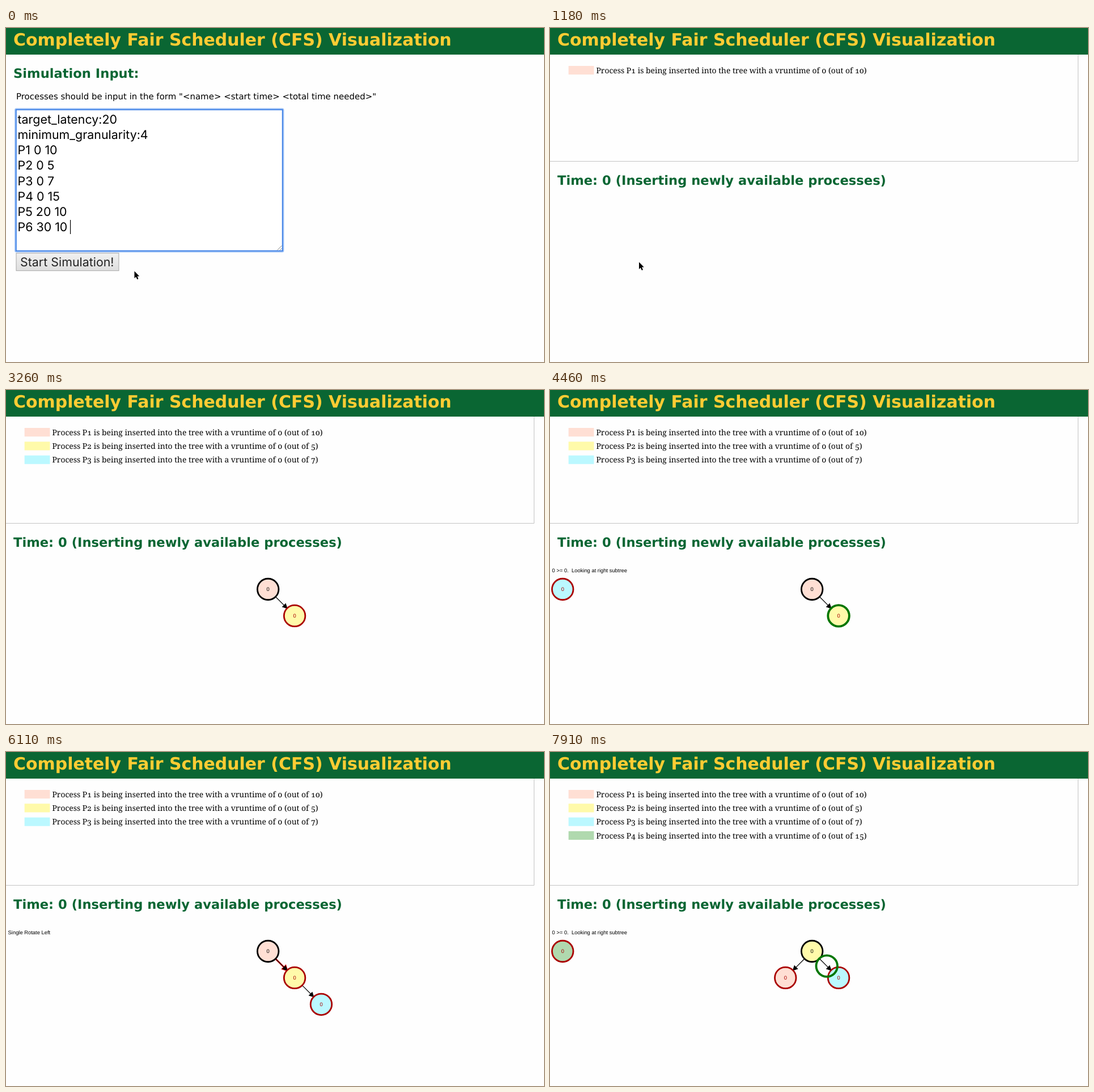
These frames come from a looping animation (949 px wide and 590 px high, 8 s). An HTML page:

```html
<!DOCTYPE html>
<html lang="en">
<head>
<meta charset="utf-8">
<title>Completely Fair Scheduler</title>
<style>
  html, body { margin: 0; width: 100%; height: 100%; overflow: hidden; background: #fefefe; }
  svg { display: block; width: 949px; height: 590px; }
  text { white-space: pre; text-rendering: geometricPrecision; }
  .head { font: bold 22.63px "DejaVu Sans", sans-serif; fill: #0a6633; }
  .title { font-size: 29.95px; fill: #fc3; }
  .hint { font: 14.97px "DejaVu Sans", sans-serif; }
  .field { font: 21.4px Inter, sans-serif; }
  .log { font: 13.86px "Noto Serif", serif; font-variant-numeric: oldstyle-nums; }
  .label { font: 9.4px "Liberation Sans", sans-serif; }
</style>
</head>
<body>
<svg id="stage" viewBox="0 0 949 590"></svg>
<script>
const LOOP = 8000, STEP = 150;
const R = 18.76, RED = '#a00', BLACK = '#000', HIGHLIGHT = '#f00', RING = '#070';
const FILLS = ['#ffdfd4', '#fffaaa', '#bbf8ff', '#b0d9ae'];
const BURSTS = [10, 5, 7, 15];
const LOG_TIMES = [1180, 1620, 3260, 6860];
const INPUT = ['target_latency:20', 'minimum_granularity:4', 'P1 0 10', 'P2 0 5',
  'P3 0 7', 'P4 0 15', 'P5 20 10', 'P6 30 10'];

// Places in the tree
const START = [22.3, 352], ROOT = [462.2, 352], LEFT = [415.3, 398.9],
  RIGHT = [509.1, 398.9], FAR = [556, 445.8];

const LOOKING = '0 >= 0.  Looking at right subtree';
const FOUND = 'Found null tree (or phantom leaf), inserting element';
const MESSAGES = [
  [1330, 'Inserting 0'], [1620, ''], [1770, 'Inserting 0'], [2210, LOOKING],
  [2520, FOUND], [3260, ''], [3410, 'Inserting 0'], [3860, LOOKING], [5050, FOUND],
  [5660, 'Node and parent are both red.  Node is right child, parent is right child\n' +
    'Can fix extra redness with a single rotation'],
  [6110, 'Single Rotate Left'], [6860, ''], [7010, 'Inserting 0'], [7460, LOOKING]
];

// Pulsing pairs: from, to, indices of the nodes
const PULSES = [[2210, 2520, 0, 1], [3860, 4210, 0, 2], [4600, 5050, 1, 2], [7460, 7810, 1, 3]];
// Travelling rings: from, arrival, removal
const RINGS = [[4210, 4390, 4600], [7810, 7990, 8000]];

const clamp = v => Math.max(0, Math.min(1, v));
const progress = (t, a, b) => clamp((t - a) / (b - a));
const mix = (p, q, k) => p.map((v, i) => v + (q[i] - v) * k);
const within = (t, a, b) => t >= a && t < b;
const escapeText = s => s.replace(/&/g, '&amp;').replace(/</g, '&lt;').replace(/>/g, '&gt;');
const text = (x, y, s, cls, extra = '') =>
  `<text x="${x}" y="${y}" class="${cls}" ${extra}>${escapeText(s)}</text>`;
const rect = (x, y, w, h, extra) =>
  `<rect x="${x}" y="${y}" width="${w}" height="${h}" ${extra}/>`;
const circle = ([x, y], r, fill, stroke = 'none', width = 0) =>
  `<circle cx="${x}" cy="${y}" r="${r}" fill="${fill}" stroke="${stroke}" stroke-width="${width}"/>`;
// Extra size of a highlight that has been pulsing for some time
const pulseSize = age => 0.94 * (3 + 2.5 * Math.abs(Math.sin(age / 90)));

function refreshTime(t) {
  if (t < 300) return Math.floor(t / STEP) * STEP;
  if (t >= 2060) return 2060 + Math.floor((t - 2060) / STEP) * STEP;
  const group = Math.floor((t - 300) / 440), rest = (t - 300) % 440;
  return 300 + group * 440 + Math.min(2, Math.floor(rest / STEP)) * STEP;
}

function form(t) {
  const focused = t < 740;
  let s = text(13, 88, 'Simulation Input:', 'head') +
    text(18, 126, 'Processes should be input in the form "<name> <start time> <total time needed>"', 'hint');
  if (focused) {
    s += rect(17, 143.5, 471.5, 251, 'rx="1.5" fill="none" stroke="#a9c9f8" stroke-width="4"') +
      rect(17.8, 144.3, 470, 249.4, 'fill="#fff" stroke="#4384e6" stroke-width="2"') +
      rect(113, 339, 1.2, 25, '');
  } else {
    s += rect(18, 144.5, 469.5, 249, 'fill="#fff" stroke="#a9a9a9"');
  }
  INPUT.forEach((line, i) => s += text(20.5, 169 + i * 27.15, line, 'field'));
  s += '<path d="M478.5 392.5l8-8M483 392.5l3.5-3.5" stroke="#888" fill="none"/>' +
    '<linearGradient id="face" x2="0" y2="1"><stop stop-color="#f1f1f1"/><stop offset="1" stop-color="#dedede"/></linearGradient>' +
    rect(18, 397.7, 181, 31, `fill="${focused ? 'url(#face)' : '#d4d4d4'}" stroke="#a6a6a6"`) +
    text(25, 421, 'Start Simulation!', 'field', 'fill="#222"');
  return s;
}

function log(t) {
  let s = '<path d="M0 235.5H931.5V47" fill="none" stroke="#c3c3c3"/>' +
    text(13, 277, 'Time: 0 (Inserting newly available processes)', 'head');
  LOG_TIMES.forEach((from, i) => {
    if (t < from) return;
    const y = 67 + i * 24.3;
    s += rect(32.7, y, 44.8, 15.2, `fill="${FILLS[i]}"`) +
      text(81.5, y + 12.8, `Process P${i + 1} is being inserted into the tree with a vruntime of 0 (out of ${BURSTS[i]})`, 'log');
  });
  return s;
}

function message(t) {
  const current = MESSAGES.filter(([from]) => t >= from).pop();
  if (!current) return '';
  const x = current[1].startsWith('Inserting') ? 6 : 3.6;
  return current[1].split('\n').map((line, i) => text(x, 322.3 + i * 11, line, 'label')).join('');
}

function edge(p, q, glow) {
  const dx = q[0] - p[0], dy = q[1] - p[1], len = Math.hypot(dx, dy);
  if (len < 2 * R) return '';
  const ux = dx / len, uy = dy / len;
  const at = (along, side) => `${p[0] + ux * along - uy * side} ${p[1] + uy * along + ux * side}`;
  const tip = len - R, base = tip - 7.5;
  const path = `M${at(R, 0)}L${at(tip, 0)}M${at(tip, 0)}L${at(base, 3.8)}L${at(base, -3.8)}Z`;
  const draw = (color, w) => `<path d="${path}" fill="${color}" stroke="${color}" stroke-width="${w}"/>`;
  return (glow ? draw(HIGHLIGHT, glow) : '') + draw(BLACK, 1.2);
}

function node(p, fill, color, glow) {
  return (glow ? circle(p, R + glow, HIGHLIGHT) : '') + circle(p, R, fill, color, 2.8) +
    text(p[0], p[1] + 3.3, '0', 'label', `fill="${color}" text-anchor="middle"`);
}

function tree(t) {
  const turn = progress(t, 6460, 6640), rotated = t >= 6460;
  const places = [
    mix(ROOT, LEFT, turn),
    rotated ? mix(RIGHT, ROOT, turn) : mix(START, RIGHT, progress(t, 2520, 2700)),
    rotated ? mix(FAR, RIGHT, turn) : mix(START, FAR, progress(t, 5050, 5300)),
    START
  ];
  const born = [1330, 1770, 3410, 7010];
  const black = rotated ? 1 : 0;
  const pulse = PULSES.find(([a, b]) => within(t, a, b));
  let s = '';
  if (rotated) s += edge(places[1], places[0]);
  else if (t >= 2520) s += edge(places[0], places[1], t >= 6110 && pulseSize(t - 6110));
  if (t >= 5050) s += edge(places[1], places[2]);
  places.forEach((p, i) => {
    const glow = pulse && pulse.slice(2).includes(i) ? pulseSize(t - pulse[0]) : 0;
    if (t >= born[i]) s += node(p, FILLS[i], i === black ? BLACK : RED, glow);
  });
  for (const [from, to, end] of RINGS)
    if (within(t, from, end)) s += circle(mix(ROOT, RIGHT, progress(t, from, to)), R, 'none', RING, 3.8);
  return s;
}

function cursor(t) {
  if (t >= 2060) return '';
  const k = progress(t, 0, 600), rest = [156.5, 413];
  const [x, y] = t < 1480 ? mix([226, 429], rest, k * k * (3 - 2 * k))
    : mix(rest, [362, 569], progress(t, 1480, 1920));
  return `<path transform="translate(${x} ${y})" d="M.5 .5V13l2.8-2.6 2 4.7 2.2-.9-2-4.6h3.8Z" stroke="#fff" stroke-width="1.6" paint-order="stroke"/>`;
}

function scene(t) {
  return rect(0, 0, 949, 590, 'fill="#fefefe"') +
    rect(0, 0, 949, 47, 'fill="#0a6633"') +
    text(13, 31, 'Completely Fair Scheduler (CFS) Visualization', 'head title') +
    (t < 1040 ? form(t) : log(t) + message(t) + tree(t)) + cursor(t);
}

const stage = document.getElementById('stage');
const begin = performance.now();
let shown = -1;
function tick() {
  const t = refreshTime((performance.now() - begin) % LOOP);
  if (t !== shown) stage.innerHTML = scene(shown = t);
  requestAnimationFrame(tick);
}
tick();
</script>
</body>
</html>
```
